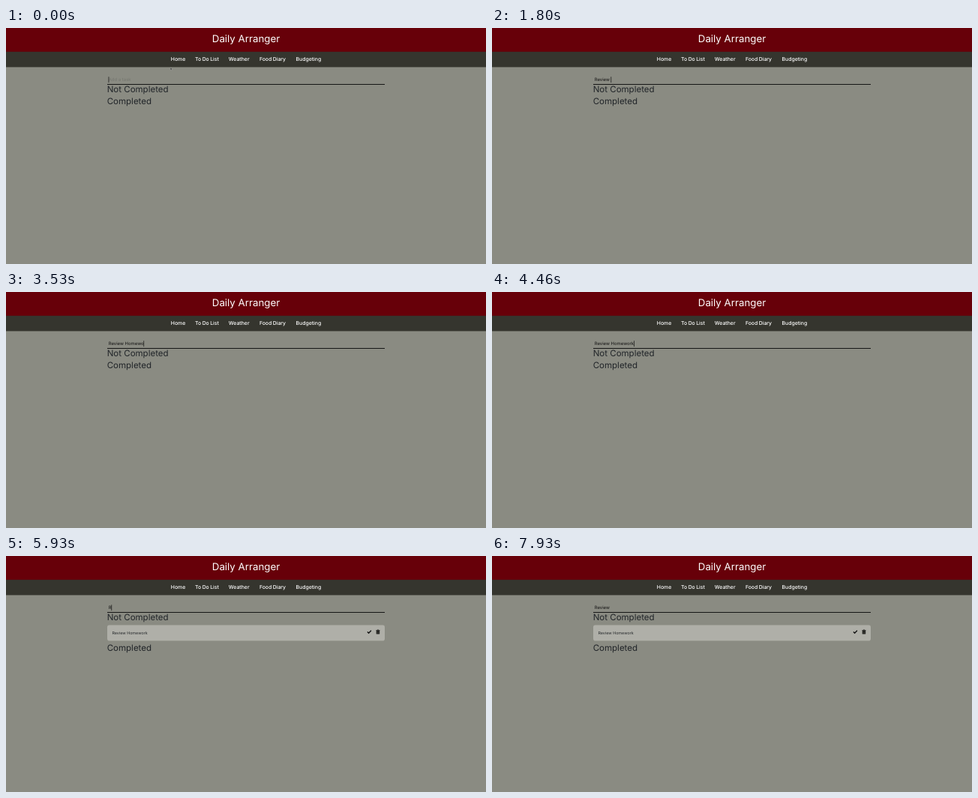
These frames come from a looping animation (640 by 316 pixels, 8 s). An HTML page:

```html
<!DOCTYPE html>
<html lang="en">
<head>
<meta charset="utf-8">
<title>To Do List</title>
<style>
  html, body { margin: 0; width: 100%; height: 100%; overflow: hidden; background: #8a8b82; }
  svg { display: block; width: 100%; height: 100%; }
  text { font-family: Inter, "Open Sans", sans-serif; text-rendering: geometricPrecision; white-space: pre; }
  .title { font-size: 13.3px; fill: #fff; text-anchor: middle; }
  .nav { font-size: 6.9px; font-weight: 500; word-spacing: -.4px; fill: #fff; text-anchor: middle; }
  .head { font-size: 11.5px; fill: #212529; }
  .field { font-size: 5.97px; fill: #111; }
  .hint { fill: #75766f; }
  .task { font-size: 5.4px; fill: #24272a; }
</style>
</head>
<body>
<svg viewBox="0 0 640 316" preserveAspectRatio="none">
  <rect width="640" height="316" fill="#8a8b82"/>
  <rect width="640" height="52.4" fill="#35352e"/>
  <rect width="640" height="31.8" fill="#670009"/>
  <text class="title" x="320" y="19.4">Daily Arranger</text>
  <g class="nav">
    <text x="229.5" y="44.4">Home</text>
    <text x="268" y="44.4">To Do List</text>
    <text x="310.7" y="44.4">Weather</text>
    <text x="355.5" y="44.4">Food Diary</text>
    <text x="403.4" y="44.4">Budgeting</text>
  </g>

  <text id="hint" class="field hint" x="136.7" y="71.4">Add a task</text>
  <text id="typed" class="field" x="136.7" y="71.4"></text>
  <rect id="caret" y="65.3" width=".7" height="7.8" fill="#111"/>
  <rect x="135" y="75" width="370" height="1" fill="#151515"/>

  <text class="head" x="134.7" y="86.3">Not Completed</text>
  <g id="card">
    <rect x="135" y="92.4" width="370" height="21.2" rx="2.8" fill="#afafa8"/>
    <text class="task" x="141.4" y="104.5">Review Homework</text>
    <g id="icons">
      <path d="M481.9 101.5l1.7 1.7 3.3-3.4" fill="none" stroke="#111" stroke-width="1.3"/>
      <path d="M493.4 98.9h1.5l.3-.5h1.5l.3 .5h1.5v.8h-5.1zM493.7 100.1h4.5v3.8q0 .6-.6 .6h-3.3q-.6 0-.6-.6z" fill="#1c1c1a"/>
      <path d="M494.9 100.8v3M496 100.8v3M497.1 100.8v3" stroke="#77776f" stroke-width=".3"/>
    </g>
  </g>
  <text id="done" class="head" x="134.7" y="101.5">Completed</text>
  <path id="mouse" d="M219.3 53v3.2l.8-.7 .5 1.1 .6-.3-.5-1.1h.9z" fill="#111" stroke="#ddd" stroke-width=".3"/>
</svg>
<script>
  const LOOP = 8000, SUBMIT = 4930, ICONS = 5000, BLINK = 530;
  const TASK = "Review Homework";
  // moment of each keystroke, in ms
  const first = [60, 600, 800, 1130, 1460, 1600, 1800, 2260, 2660, 2930, 3060, 3400, 3530, 3860, 4460];
  const second = [5930, 6400, 6530, 6860, 7260, 7400];

  const $ = id => document.getElementById(id);
  const show = (id, on) => $(id).setAttribute("visibility", on ? "inherit" : "hidden");

  function draw(t) {
    const sent = t >= SUBMIT;
    const keys = (sent ? second : first).filter(k => k <= t);
    const n = keys.length;
    const last = n ? keys[n - 1] : sent ? SUBMIT : 0;
    const typed = $("typed");
    const text = TASK.slice(0, n);
    if (typed.textContent !== text) typed.textContent = text;
    const width = n ? typed.getSubStringLength(0, n) : 0;
    $("caret").setAttribute("x", 136.6 + width);
    show("caret", Math.floor((t - last) / BLINK) % 2 === 0);
    show("hint", !n);
    show("mouse", t < first[0]);
    show("card", sent);
    show("icons", t >= ICONS);
    $("done").setAttribute("y", sent ? 126.9 : 101.5);
  }

  const start = performance.now();
  function tick() {
    draw((performance.now() - start) % LOOP);
    requestAnimationFrame(tick);
  }
  tick();
</script>
</body>
</html>
```
